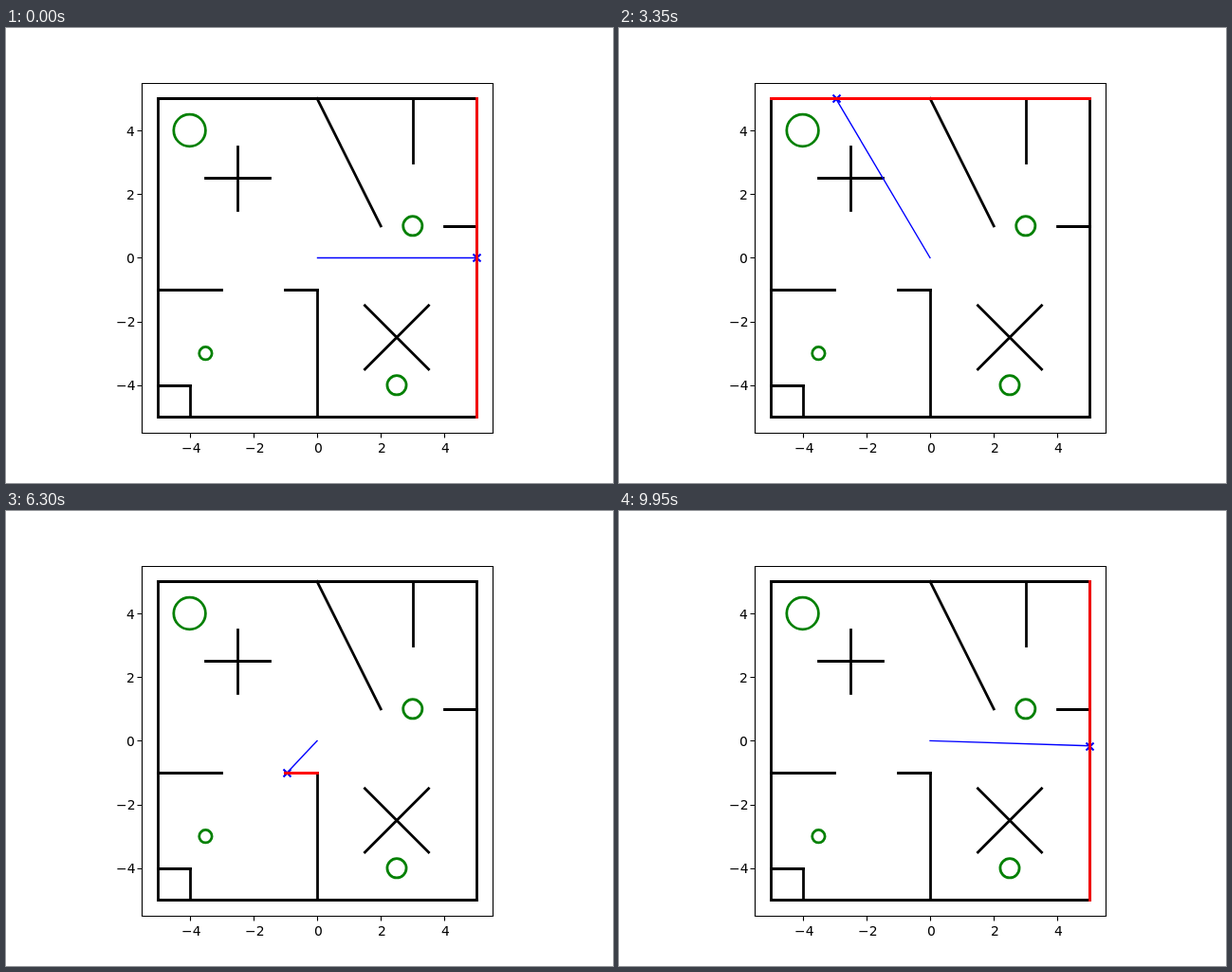
These frames come from a looping animation (640x480 px, 10000 ms). An HTML page:

```html
<!DOCTYPE html>
<html lang="en">
<head>
<meta charset="utf-8">
<title>Ray casting</title>
<style>
  html, body { margin: 0; height: 100%; overflow: hidden; background: #fff; }
  svg { display: block; }
  text { font: 13.889px "DejaVu Sans", sans-serif; }
  path { fill: none; }
  .axis { stroke: #000; stroke-width: 1.111; }
  .shape { stroke-width: 2.778; stroke-linecap: square; }
  .ray { stroke: #00f; stroke-width: 1.389; stroke-linecap: square; }
  .marker { stroke: #00f; stroke-width: 2.083; }
</style>
</head>
<body>
<svg width="640" height="480" viewBox="0 0 640 480"></svg>
<script>
const svg = document.querySelector('svg');
const FRAME_MS = 50, FRAMES = 200;
const UNIT = 33.6, HALF = 5;

const px = x => 328 + UNIT * x;
const py = y => 242.4 - UNIT * y;
const snap = v => Math.floor(v + 0.5) + 0.5;

function add(tag, attrs, text = '') {
  const el = document.createElementNS('http://www.w3.org/2000/svg', tag);
  for (const key in attrs) el.setAttribute(key, attrs[key]);
  el.textContent = text;
  return svg.appendChild(el);
}

const shapes = [];
function addShape(d, stroke, distance) {
  add('path', { class: 'shape', d, stroke });
  shapes.push({ d, distance });
}

// Horizontal and vertical lines sit on whole pixels.
function segmentPath(x1, y1, x2, y2) {
  const straight = Math.min(Math.abs(x1 - x2), Math.abs(y1 - y2)) < 1e-6;
  const fit = straight ? snap : v => v;
  return `M${fit(px(x1))} ${fit(py(y1))}L${fit(px(x2))} ${fit(py(y2))}`;
}

function wall(x1, y1, x2, y2) {
  const ex = x2 - x1, ey = y2 - y1;
  addShape(segmentPath(x1, y1, x2, y2), '#000', (dx, dy) => {
    const det = dx * ey - dy * ex;
    const t = (x1 * ey - y1 * ex) / det, u = (x1 * dy - y1 * dx) / det;
    return t > 0 && u >= 0 && u <= 1 ? t : Infinity;
  });
}

// Two equal bars crossing at right angles in (x, y).
function cross(x, y, dx, dy) {
  wall(x - dx, y - dy, x + dx, y + dy);
  wall(x + dy, y - dx, x - dy, y + dx);
}

function circle(x, y, r) {
  const R = UNIT * r;
  const d = `M${px(x) - R} ${py(y)}a${R} ${R} 0 1 0 ${2 * R} 0a${R} ${R} 0 1 0 ${-2 * R} 0z`;
  addShape(d, '#008000', (dx, dy) => {
    const along = x * dx + y * dy;
    const disc = along * along - (x * x + y * y - r * r);
    return along > 0 && disc >= 0 ? along - Math.sqrt(disc) : Infinity;
  });
}

circle(-4, 4, 0.5);
circle(3, 1, 0.3);
circle(-3.5, -3, 0.2);
circle(2.5, -4, 0.3);

for (const side of [-HALF, HALF]) {
  wall(-HALF, side, HALF, side);
  wall(side, -HALF, side, HALF);
}
wall(0, HALF, 2, 1);
wall(3, HALF, 3, 3);
wall(4, 1, HALF, 1);
wall(-HALF, -1, -3, -1);
wall(-1, -1, 0, -1);
wall(0, -1, 0, -HALF);
wall(-HALF, -4, -4, -4);
wall(-4, -4, -4, -HALF);
cross(-2.5, 2.5, 1, 0);
cross(2.5, -2.5, 1, 1);

const ray = add('path', { class: 'ray' });
const marker = add('path', { class: 'marker' });
const highlight = add('path', { class: 'shape', stroke: '#f00' });

add('path', { class: 'axis', d: 'M143.5 58.5H513.5V427.5H143.5Z' });
for (let v = -4; v <= 4; v += 2) {
  const label = String(v).replace('-', '\u2212');
  const inkWidth = v < 0 ? 18 : 7;
  add('path', { class: 'axis', d: `M${snap(px(v))} 427.5v5M143.5 ${snap(py(v))}h-5` });
  add('text', { x: Math.round(px(v) - inkWidth / 2), y: 448 }, label);
  add('text', { x: Math.round(133.5 - inkWidth), y: Math.round(py(v) + 5.6) }, label);
}

function draw(now) {
  const step = Math.floor(now / FRAME_MS) % FRAMES;
  const angle = step * 2 * Math.PI / FRAMES;
  const dx = Math.cos(angle), dy = Math.sin(angle);
  let hit, nearest = Infinity;
  for (const shape of shapes) {
    const t = shape.distance(dx, dy);
    if (t < nearest) [hit, nearest] = [shape, t];
  }
  const x = nearest * dx, y = nearest * dy;
  ray.setAttribute('d', segmentPath(0, 0, x, y));
  marker.setAttribute('d', `M${snap(px(x)) - 4} ${snap(py(y)) - 4}l8 8m-8 0l8 -8`);
  highlight.setAttribute('d', hit.d);
}

const start = performance.now();
function tick() {
  draw(performance.now() - start);
  requestAnimationFrame(tick);
}
tick();
</script>
</body>
</html>
```
